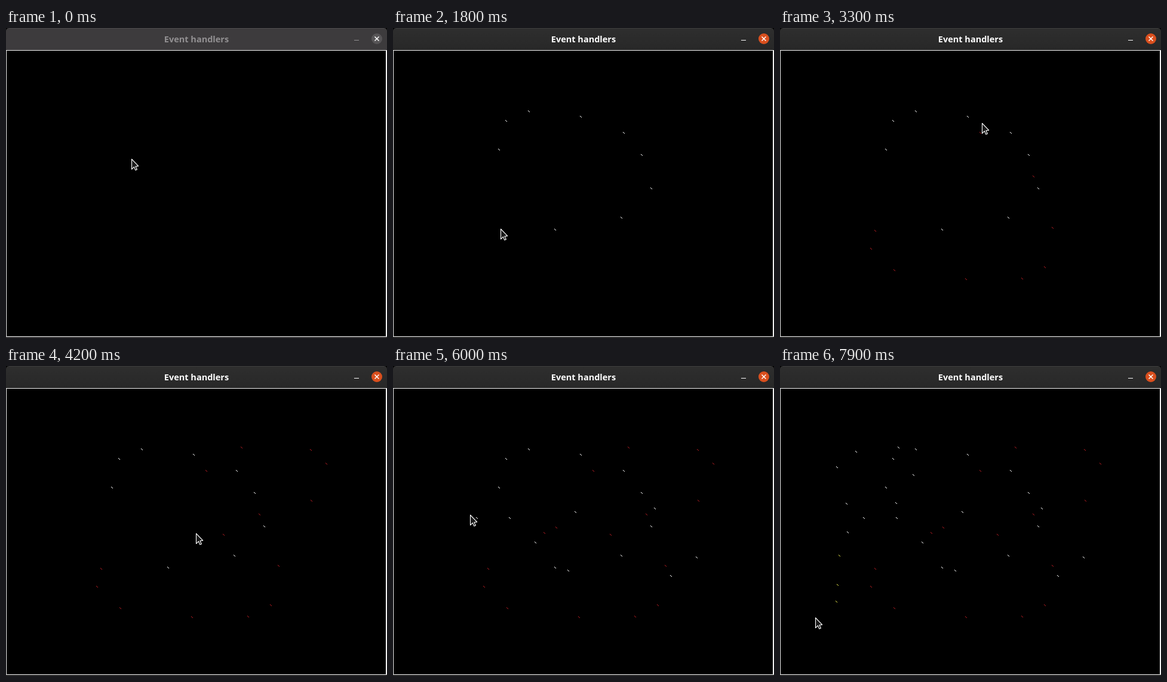
An HTML page with a canvas that plays this animation: 638 by 519 pixels, repeating every 8 s.

```html
<!DOCTYPE html>
<html lang="en">
<head>
<meta charset="utf-8">
<title>Event handlers</title>
<style>
  html, body { margin: 0; width: 100%; height: 100%; overflow: hidden; background: #000; }
  canvas { display: block; width: 638px; height: 519px; }
</style>
</head>
<body>
<canvas id="stage" width="638" height="519"></canvas>
<script>
const ctx = document.getElementById('stage').getContext('2d');
const LOOP = 8000;
const STEP = 100; // the screen refreshes in steps

// The pointer travels from click to click, at one even pace per colour.
const path = [{ t: 280, x: 211, y: 220 }];

function clickThrough(color, end, ...points) {
  const start = path[path.length - 1].t;
  points.forEach(([x, y], i) => {
    const t = start + (end - start) * (i + 1) / points.length;
    path.push({ t, x, y, color });
  });
}

clickThrough('#ffffff', 1670,
  [177, 203], [189, 155], [227, 139], [314, 148], [386, 175],
  [416, 212], [432, 268], [382, 317], [271, 337]);
clickThrough('#b81c22', 4478,
  [159, 339], [152, 369], [191, 405], [311, 420], [405, 419], [443, 400],
  [456, 334], [424, 248], [335, 175], [394, 136], [510, 140], [536, 163],
  [511, 225], [364, 282], [273, 270], [253, 279]);
clickThrough('#ffffff', 7240,
  [238, 295], [293, 342], [465, 351], [508, 320], [438, 238],
  [305, 244], [195, 254], [140, 254], [111, 230], [95, 169],
  [127, 143], [198, 136], [223, 182], [194, 229], [113, 278]);
clickThrough('#e8e84a', 7900, [99, 317], [96, 366], [94, 394], [60, 422]);

const clicks = path.slice(1);

function spline(a, b, c, d, u) {
  return b + u / 2 * (c - a + u * (2 * a - 5 * b + 4 * c - d + u * (3 * (b - c) + d - a)));
}

function pointerAt(t) {
  const last = path.length - 1;
  const next = path.findIndex(p => p.t > t);
  if (next === 0) return path[0];
  if (next < 0) return path[last];
  const b = path[next - 1], c = path[next];
  const a = path[Math.max(next - 2, 0)], d = path[Math.min(next + 1, last)];
  const u = (t - b.t) / (c.t - b.t);
  return {
    x: Math.round(spline(a.x, b.x, c.x, d.x, u)),
    y: Math.round(spline(a.y, b.y, c.y, d.y, u))
  };
}

function line(color, width, x1, y1, x2, y2) {
  ctx.strokeStyle = color;
  ctx.lineWidth = width;
  ctx.beginPath();
  ctx.moveTo(x1, y1);
  ctx.lineTo(x2, y2);
  ctx.stroke();
}

function drawTitleBar(focused) {
  const bar = ctx.createLinearGradient(0, 0, 0, 37);
  bar.addColorStop(0, focused ? '#2e2e2e' : '#3d3b3d');
  bar.addColorStop(1, focused ? '#282828' : '#3d3b3d');
  ctx.fillStyle = bar;
  ctx.beginPath();
  ctx.roundRect(0, 0, 638, 37, [5, 5, 0, 0]);
  ctx.fill();
  line(focused ? '#3c3c3c' : '#4a484a', 1, 5, 0.5, 633, 0.5);

  ctx.fillStyle = focused ? '#ffffff' : '#929092';
  ctx.font = 'bold 14.5px "Open Sans", "Noto Sans", sans-serif';
  ctx.textAlign = 'center';
  ctx.fillText('Event handlers', 319, 24);
  ctx.fillRect(583, 20, 8, 1);

  ctx.fillStyle = focused ? '#d94f1e' : '#575557';
  ctx.beginPath();
  ctx.arc(621, 18, 9, 0, Math.PI * 2);
  ctx.fill();
  line('#fff', 1.5, 617.5, 14.5, 624.5, 21.5);
  line('#fff', 1.5, 624.5, 14.5, 617.5, 21.5);
}

function drawWindow(focused) {
  ctx.fillStyle = '#000';
  ctx.fillRect(0, 0, 638, 519);
  drawTitleBar(focused);
  ctx.fillStyle = focused ? '#2a2a2a' : '#3b393b';
  ctx.fillRect(0, 517, 638, 2);
  ctx.fillStyle = '#f0f0f0';
  ctx.fillRect(0, 37, 638, 480);
  ctx.fillStyle = '#000';
  ctx.fillRect(1, 38, 635, 478);
}

function drawDot({ x, y, color }) {
  ctx.fillStyle = color;
  for (let d = -1; d <= 1; d++) ctx.fillRect(x + d, y + d, 1, 1);
}

const arrow = new Path2D('M0 0V17L3.9 13.2 6.3 18.6 8.9 17.4 6.5 12.2 11.2 11.6Z');

function drawPointer({ x, y }) {
  ctx.save();
  ctx.translate(x - 0.5, y - 0.5);
  ctx.fillStyle = '#1c1c1c';
  ctx.fill(arrow);
  ctx.strokeStyle = '#fff';
  ctx.lineWidth = 1.1;
  ctx.lineJoin = 'round';
  ctx.stroke(arrow);
  ctx.restore();
}

function frame(now) {
  const t = Math.floor((now % LOOP) / STEP) * STEP;
  const done = clicks.filter(c => c.t <= t);
  drawWindow(t >= path[0].t + STEP);
  done.forEach(drawDot);
  drawPointer(pointerAt(t));
  requestAnimationFrame(frame);
}
requestAnimationFrame(frame);
</script>
</body>
</html>
```
